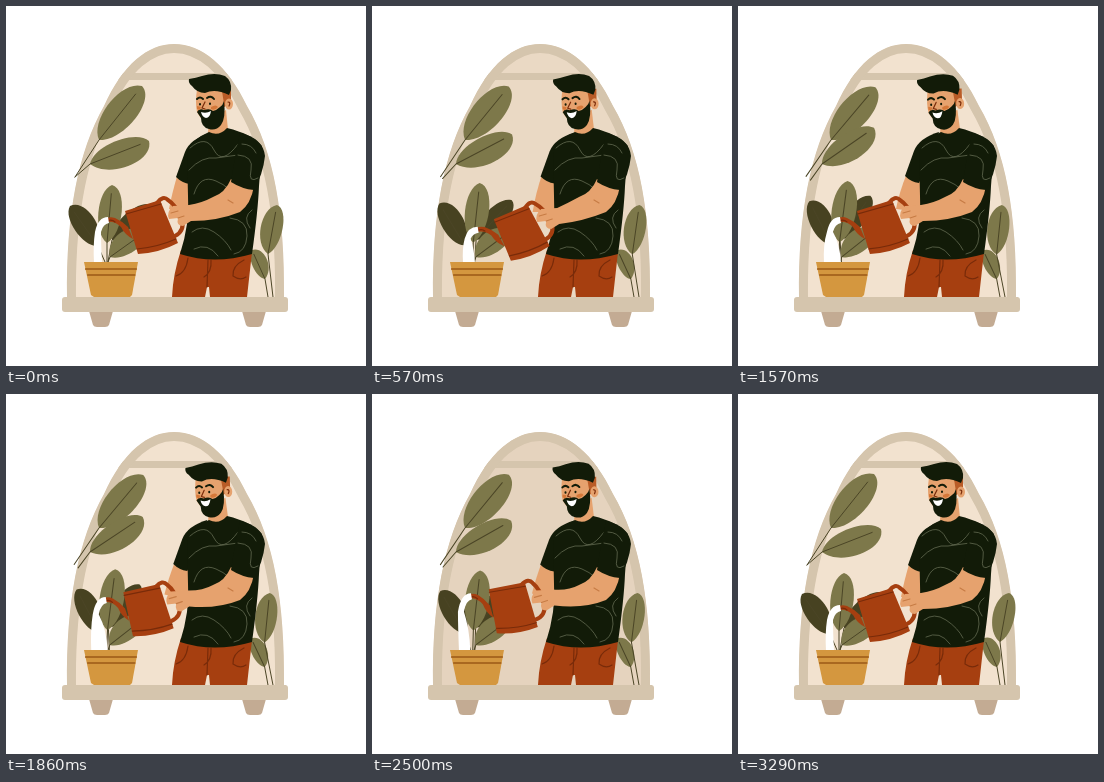
An HTML page that plays this animation: 360 px wide and 360 px high, repeating every 3.57 s.

```html
<!DOCTYPE html>
<html lang="en">
<head>
<meta charset="utf-8">
<title>Watering the plants</title>
<style>
  html, body { margin: 0; width: 100%; height: 100%; overflow: hidden; background: #fff; }
  svg { display: block; width: 100vw; height: 100vh; }
  path, line { stroke-linecap: round; stroke-linejoin: round; }
  .rim { fill: #d5c5ad; }
  .foot { fill: #c3ab93; }
  .skin { fill: #e6a26e; }
  .ink { fill: #121b08; }
  .rust { fill: #a63f10; }
  .line { fill: none; stroke: #4b4526; stroke-width: 1; }
  .print { fill: none; stroke: #626a51; stroke-width: .8; }
  .seam { fill: none; stroke: #792b09; stroke-width: 1.2; }
</style>
</head>
<body>
<svg viewBox="0 0 360 360">
  <defs>
    <path id="arch" d="M61 292C60 208 72 146 98 100C117 58 142 38 168 38C196 38 222 60 241 100C268 146 279 208 278 292V304H61Z"/>
    <clipPath id="inside"><use href="#arch"/></clipPath>
  </defs>

  <g clip-path="url(#inside)">
    <use href="#arch" fill="#f2e2cf"/>
    <use href="#arch" id="shade" fill="#d5c2a8"/>
    <rect class="rim" x="112" y="67" width="115" height="7"/>
    <use href="#arch" fill="none" stroke="#d5c5ad" stroke-width="18"/>
  </g>

  <g id="plants"></g>

  <!-- trousers -->
  <path class="rust" d="M175 244L246 246L241 291H204L203 281L201 281L199 291H166Q167 268 175 244Z"/>
  <path class="seam" d="M182 252Q180 267 170 270M238 254Q226 260 227 270Q234 275 240 271M205 254Q206 266 198 271M202 254L201 281"/>

  <path class="skin" id="rearArm"/>

  <g id="head">
    <path class="skin" d="M203 112L220 104L222 124Q213 133 202 127Z"/>
    <path fill="#b95c27" d="M211 83L225 83L225 96L217 102Z"/>
    <path class="skin" d="M191 83Q189 97 191 106Q197 118 208 117Q218 111 218 98L216 85Z"/>
    <ellipse class="skin" cx="223" cy="98" rx="4" ry="5.5"/>
    <path class="seam" d="M222 96Q225 96 223 100"/>
    <path class="ink" d="M218 95Q220 112 215 119Q210 125 203 123Q195 121 195 112L191 106Q193 102 198 104Q204 102 207 105Q211 104 214 101Q217 99 218 95Z"/>
    <path fill="#fff" d="M195 106Q200 108 205 105Q204 112 200 112Q196 111 195 106Z"/>
    <path fill="#d57839" d="M205 101Q210 98 212 101Q209 105 205 103ZM191 100L195 101L194 104L191 103Z"/>
    <path class="seam" d="M199 96L196 102L199 103"/>
    <path d="M191 93Q194 90 197 93M201 92Q205 89 208 93" fill="none" stroke="#121b08" stroke-width="2"/>
    <path d="M194 98V98.500M204 97.500V98" fill="none" stroke="#121b08" stroke-width="2"/>
    <path class="ink" id="cap" d="M183 73Q190 72 196 70Q209 66 219 70Q226 75 225 84L223 89Q209 82 199 87Q191 87 186 80Q182 77 183 73Z"/>
  </g>

  <path class="ink" id="sleeve" d="M204 127Q184 133 179 146L170 171Q176 177 184 178L197 150Z"/>
  <path class="ink" d="M203 126Q186 133 181 146L182 190Q184 217 174 248Q208 259 246 248Q252 205 253 180L256 140Q246 128 221 122Q213 131 203 126Z"/>
  <path class="print" d="M184 142Q200 128 208 144T232 138M183 164Q196 150 210 152L232 149M188 188Q194 168 210 175T226 190M186 226Q196 218 208 226T225 244M224 212Q242 214 241 230T228 248M188 243Q202 236 212 250M246 204Q236 211 244 222"/>

  <g id="can">
    <path d="M151 197Q157 189 162 194Q170 199 176 213Q179 225 169 230" fill="none" stroke="#a63f10" stroke-width="4"/>
    <path class="rust" d="M100 213Q103 210 109 212Q116 215 122 221L127 233Q119 229 115 221Q109 215 101 216Z"/>
    <path class="rust" d="M119 205L154 194L172 237Q153 247 132 248Z"/>
    <path class="seam" d="M120 208L155 198M131 243Q152 241 170 233M101 215Q106 213 109 216"/>
  </g>

  <path class="skin" id="arm"/>
  <path class="seam" id="fingers" style="stroke:#c77c45"/>
  <path class="ink" d="M234 127Q257 132 259 150Q257 168 248 184Q236 183 225 176L230 145Z"/>
  <path class="print" d="M232 149Q248 150 245 164T252 172M236 138Q246 138 250 147"/>

  <path id="water" fill="#fff"/>

  <!-- pot -->
  <path fill="#d4973f" d="M78 256H132L126 289L124 291H88L85 289Z"/>
  <path d="M80 263H130M82 269H128.500" stroke="#a96820" stroke-width="2.200"/>

  <path class="foot" d="M83 305H107L103 319Q102 321 99 321H91Q88 321 87 319ZM236 305H260L256 319Q255 321 252 321H244Q241 321 240 319Z"/>
  <rect class="rim" x="56" y="291" width="226" height="15" rx="3"/>
</svg>

<script>
const LOOP = 3570, MOVE = 3290, STEPS = 46;
const $ = id => document.getElementById(id);

// Key poses around the moving part of the loop
const TIMES = [0, 570, 1070, 1570, 2210, 2790, MOVE];
const tracks = {
  sway:  [0, .47, .74, 1, .72, .46, 0],
  lean:  [0, .5, .88, 1, .95, .5, 0],
  tilt:  [0, -5.5, -8, 0, 8, 3.5, 0],
  shade: [0, .28, .2, 0, .13, .67, 0],
  left:  [88, 91, 94, 86, 86, 88, 88],
  right: [96, 103, 105, 103, 100, 97, 96]
};

// Smooth curve through the key poses
function sample(v, t) {
  const last = TIMES.length - 1;
  let i = 0;
  while (i < last - 1 && t >= TIMES[i + 1]) i++;
  const slope = k => k === 0 || k === last ? 0
    : (v[k + 1] - v[k - 1]) / (TIMES[k + 1] - TIMES[k - 1]);
  const h = TIMES[i + 1] - TIMES[i], u = (t - TIMES[i]) / h, w = 1 - u;
  return w * w * ((1 + 2 * u) * v[i] + u * h * slope(i))
       + u * u * ((1 + 2 * w) * v[i + 1] - w * h * slope(i + 1));
}

function leafPath(x0, y0, x1, y1, wl, wr) {
  const dx = x1 - x0, dy = y1 - y0, len = Math.hypot(dx, dy);
  const at = (f, w) => `${(x0 + dx * f + dy / len * w).toFixed(1)} ${(y0 + dy * f - dx / len * w).toFixed(1)}`;
  return {
    shape: `M${at(0, 0)}C${at(.15, wl)} ${at(.88, wl)} ${at(1, 0)}C${at(.96, -wr)} ${at(.2, -wr)} ${at(0, 0)}Z`,
    vein: `L${at(0, 0)}L${at(.85, 0)}`
  };
}

// leaf: base, tip, half widths; root: start of the stem; pivot and swing: sway motion
const OLIVE = '#7d784a', DARK = '#474221';
const plants = [
  { leaf: [93, 134, 136, 80, 20, 20], root: [69, 171], pivot: [93, 134], swing: 1.5, color: OLIVE },
  { leaf: [84, 158, 143, 135, 16, 21], root: [69, 171], pivot: [84, 158], swing: -13.5, color: OLIVE },
  { leaf: [106, 234, 146, 199, 14, 14], root: [102, 256], pivot: [102, 250], swing: -14, color: DARK },
  { leaf: [92, 240, 64, 200, 13, 17], root: [99, 256], pivot: [102, 250], swing: 8, color: DARK },
  { leaf: [104, 251, 139, 226, 18, 12], root: [102, 256], pivot: [102, 254], swing: -3, color: OLIVE },
  { leaf: [101, 237, 106, 179, 15, 16], root: [101, 256], pivot: [102, 250], swing: 2.5, grow: .06, color: OLIVE },
  { leaf: [259, 273, 246, 244, 8, 13], root: [262, 291], pivot: [262, 291], swing: -1, color: OLIVE, lean: true },
  { leaf: [262, 248, 271, 199, 16, 13], root: [267, 291], pivot: [267, 291], swing: -4.5, color: OLIVE, lean: true }
];

for (const p of plants) {
  const { shape, vein } = leafPath(...p.leaf);
  p.node = document.createElementNS('http://www.w3.org/2000/svg', 'g');
  p.node.innerHTML = `<path d="${shape}" fill="${p.color}"/><path class="line" d="M${p.root}${vein}"/>`;
  $('plants').append(p.node);
}

const turn = (deg, x, y) => `rotate(${deg} ${x} ${y})`;
const PIVOT = [205, 180];

function draw(t) {
  const p = {};
  for (const name in tracks) p[name] = sample(tracks[name], t);

  for (const { node, pivot: [x, y], swing, grow = 0, lean } of plants) {
    const s = lean ? p.lean : p.sway;
    node.setAttribute('transform',
      `${turn(swing * s, x, y)} translate(${x} ${y}) scale(${1 + grow * s}) translate(${-x} ${-y})`);
  }

  $('shade').setAttribute('opacity', Math.max(0, p.shade));
  $('head').setAttribute('transform', turn(-2 * p.sway, 210, 122));
  $('cap').setAttribute('transform', `translate(${-2.2 * p.sway} 0)`);
  $('sleeve').setAttribute('transform', `translate(${-3 * p.sway} ${-p.sway})`);
  $('can').setAttribute('transform', turn(p.tilt, ...PIVOT));

  // The hand follows the can
  const d = -p.tilt * .55, e = -p.tilt * .4, s = p.sway;
  $('rearArm').setAttribute('d',
    `M${172 - 3 * s} 167L184 172L183 206L${163 - 5 * s} ${203 + d}Q${166 - 5 * s} 187 ${172 - 3 * s} 167Z`);
  $('arm').setAttribute('d',
    `M225 173Q219 187 207 191Q196 197 ${183 + e} ${199 + d}L${167 + e} ${200 + d}Q${160 + e} ${206 + d} ${163 + e} ${213 + d}` +
    `L${172 + e} ${212 + d}Q${170 + e} ${220 + d} ${177 + e} ${220 + d}L${185 + e} ${215 + d}Q212 215 234 206Q245 198 248 180Z`);
  $('fingers').setAttribute('d',
    `M${165 + e} ${207 + d}l7 -2M${172 + e} ${212 + d}l6 -2M222 194L227 197`);

  // Stream from the spout tip into the pot
  const a = p.tilt * Math.PI / 180, c = Math.cos(a), n = Math.sin(a);
  const x = PIVOT[0] - 103 * c - 33 * n, y = PIVOT[1] - 103 * n + 33 * c;
  const fall = 256 - y;
  $('water').setAttribute('d',
    `M${x} ${y - 2}Q${x - 10} ${y - 2} ${x - 13} ${y + fall * .3}Q${p.left - 1} ${y + fall * .6} ${p.left} 257` +
    `H${p.right}Q${p.right - 1} ${y + fall * .6} ${x - 7} ${y + fall * .3}Q${x - 5} ${y + 5} ${x + 1} ${y + 4}Z`);
}

function tick(now) {
  const step = Math.min(STEPS, Math.floor((now % LOOP + 4) * STEPS / MOVE));
  draw(step * MOVE / STEPS);
  requestAnimationFrame(tick);
}
draw(0);
requestAnimationFrame(tick);
</script>
</body>
</html>
```
